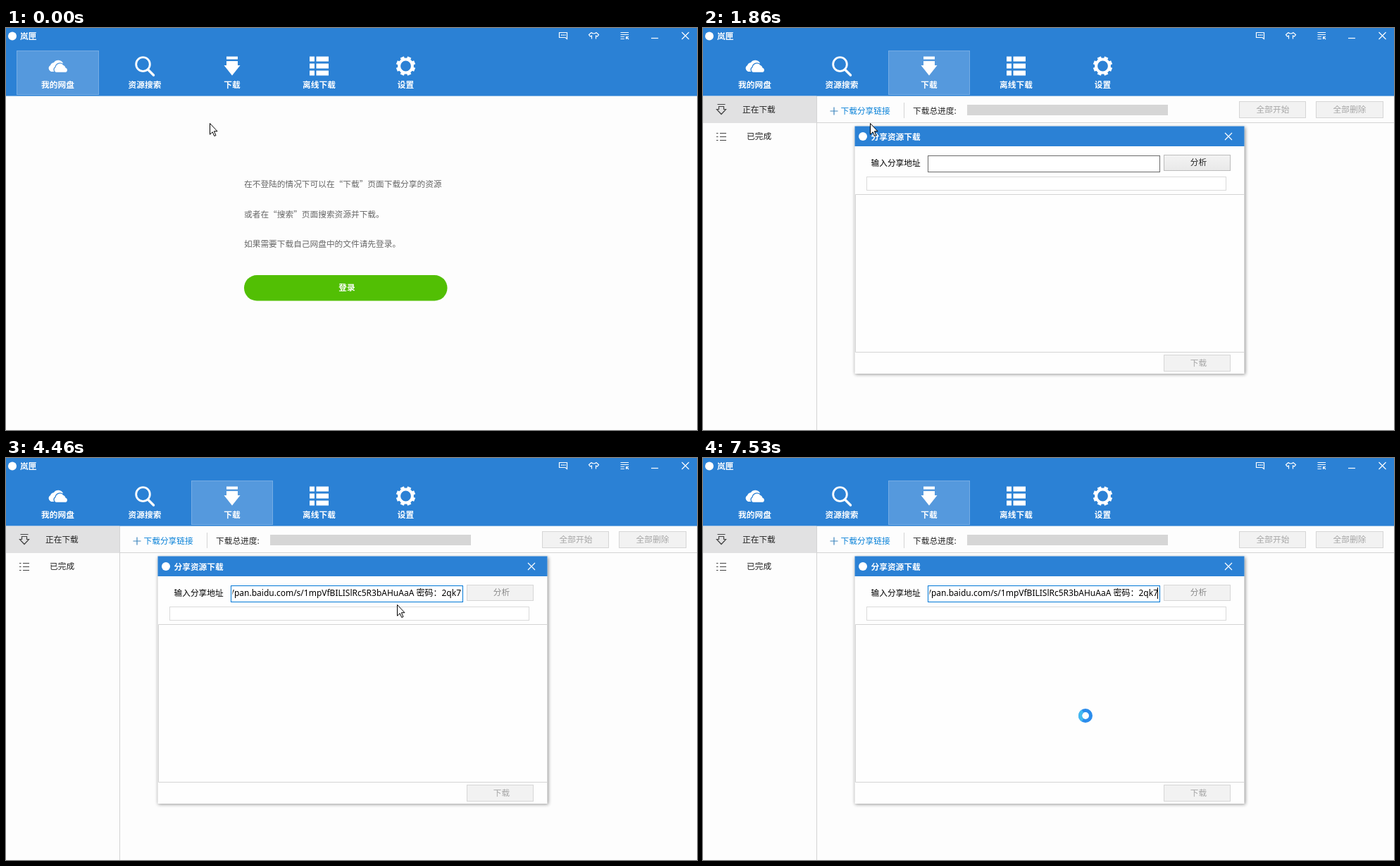
Animation of 981 by 571 pixels, one loop 8 s. Source, as an HTML page:

```html
<!DOCTYPE html>
<html lang="zh-CN">
<head>
<meta charset="utf-8">
<title>网盘下载</title>
<style>
html, body { margin: 0; width: 100%; height: 100%; overflow: hidden; background: #fdfdfd; }
svg { display: block; width: 981px; height: 571px; }
text { font: 11.7px "Noto Sans CJK SC", "Noto Sans CJK", sans-serif; fill: #222; white-space: pre; }
.latin { font-family: "Noto Sans", "Noto Sans CJK SC", sans-serif; font-size: 12px; }
.b { font-weight: 700; fill: #fff; }
.m { text-anchor: middle; }
.note { fill: #666; }
.off { fill: #a6a6a6; }
.black { fill: #000; }
.line { fill: none; stroke: #fff; stroke-width: 1.2; }
.rule { fill: none; stroke: #d4d4d4; }
.btn { fill: #f2f2f2; stroke: #d6d6d6; }
.sys { fill: #e1e1e1; stroke: #adadad; }
.tab { fill: #5599dd; stroke: #75ace4; }
.white { fill: #fff; }
.dark { fill: none; stroke: #444; stroke-width: 1.2; }
</style>
</head>
<body>
<svg viewBox="0 0 981 571" xmlns="http://www.w3.org/2000/svg">
  <defs>
    <clipPath id="clip"><rect x="321.5" y="183" width="325" height="20"/></clipPath>
    <linearGradient id="face" x2="0" y2="1"><stop stop-color="#f3f3f3"/><stop offset="1" stop-color="#e9e9e9"/></linearGradient>
    <linearGradient id="hover" x2="0" y2="1"><stop stop-color="#e8f2fc"/><stop offset="1" stop-color="#dcecfc"/></linearGradient>
    <linearGradient id="press" x2="0" y2="1"><stop stop-color="#daecfc"/><stop offset="1" stop-color="#c4e0fc"/></linearGradient>
    <filter id="soft" x="-5%" y="-5%" width="110%" height="112%"><feGaussianBlur stdDeviation="2.4"/></filter>
    <filter id="deep" x="-5%" y="-12%" width="110%" height="125%"><feGaussianBlur stdDeviation="4.5"/></filter>
    <path id="cross" class="line" d="M-5 -5L5 5M5 -5L-5 5"/>
  </defs>
  <rect width="981" height="571" fill="#fdfdfd"/>

  <!-- header -->
  <rect width="981" height="96.6" fill="#2b81d5"/>
  <circle cx="9" cy="11.5" r="6" class="white"/>
  <text class="b" x="20" y="15.5">岚匣</text>
  <g class="line">
    <path d="M785.5 6.5H796.5V15.5L794 13.5H785.5Z"/>
    <path d="M788 10H789.6M790.4 10H792M792.8 10H794.4" stroke-width="1.6"/>
    <path d="M831 6.5L827.5 9.5L829.5 12L831.5 11V15.5M831 6.5Q834.5 9.5 838 6.5L841.5 9.5L839.5 12L837.5 11V15.5"/>
    <path d="M872.5 6.5H884M872.5 9.5H884M872.5 12.5H878M872.5 15.5H878M880 12.5H884M880.5 12.5V16M880.5 12.5L884 16"/>
    <path d="M916 14.5H926"/>
  </g>
  <use href="#cross" x="964.5" y="11"/>
  <rect id="tab1" class="tab" x="15.5" y="32.5" width="116" height="62"/>
  <rect id="tab3" class="tab" x="263.5" y="32.5" width="115" height="62"/>
  <g class="white">
    <path d="M64 62A5 5 0 0 1 63 53A6 6 0 0 1 68 49A7.5 7.5 0 0 1 81 50L74 62Z"/>
    <path id="cloud" d="M71 63.5A4.5 4.5 0 0 1 70 55.5A6.8 6.8 0 0 1 82 52.5A5.2 5.2 0 0 1 85 56A4 4 0 0 1 85 63.5Z" stroke="#2b81d5" stroke-width="1.3"/>
    <path d="M313 40.5H329V44.5H313ZM313 47H329V53H332.5L321 67.5L309.5 53H313Z"/>
    <path d="M431 40.5h7v7h-7zm9.5 0h17.5v7h-17.5zM431 50.5h7v7h-7zm9.5 0h17.5v7h-17.5zM431 60.5h7v7h-7zm9.5 0h17.5v7h-17.5z"/>
  </g>
  <g fill="none" stroke="#fff">
    <circle cx="194.5" cy="51.5" r="9.8" stroke-width="2.8"/>
    <path d="M201.5 59L209.5 67" stroke-width="3.4" stroke-linecap="round"/>
    <circle cx="567.5" cy="54" r="9.4" stroke-width="4"/>
    <g id="teeth" stroke-width="5.5"/>
  </g>
  <g class="m">
    <text class="b" x="73.5" y="85">我的网盘</text>
    <text class="b" x="197" y="85">资源搜索</text>
    <text class="b" x="321" y="85">下载</text>
    <text class="b" x="444.5" y="85">离线下载</text>
    <text class="b" x="567.5" y="85">设置</text>
  </g>

  <!-- sign-in page -->
  <g id="home">
    <text class="note" x="338" y="226">在不登陆的情况下可以在“下载”页面下载分享的资源</text>
    <text class="note" x="338" y="268.5">或者在“搜索”页面搜索资源并下载。</text>
    <text class="note" x="338" y="311">如果需要下载自己网盘中的文件请先登录。</text>
    <rect x="338" y="351" width="288.5" height="36.5" rx="18.2" fill="#52bf04"/>
    <text class="b m" x="484" y="373">登录</text>
  </g>

  <!-- download page -->
  <g id="list">
    <rect y="96.6" width="161" height="38.4" fill="#e1e1e2"/>
    <path class="rule" d="M161.5 97V571M162 134.5H981M285.5 106V128"/>
    <path class="dark" d="M20.5 108.5H31.5M22.5 111.5H29.5V115.5H32.5L26 122.5L19.5 115.5H22.5Z"/>
    <path class="dark" d="M24 149.5H33M24 154.5H33M24 159.5H33"/>
    <path class="dark" d="M19 149.5H21.5M19 154.5H21.5M19 159.5H21.5" stroke-width="2"/>
    <text x="56" y="119.5">正在下载</text>
    <text x="62" y="158">已完成</text>
    <path id="plus" d="M180.5 118H191.5M186 112.5V123.5" stroke-width="1.2"/>
    <text id="link" x="195.5" y="122">下载分享链接</text>
    <text x="298" y="122">下载总进度:</text>
    <rect x="375" y="109" width="285" height="15" fill="#d6d6d6"/>
    <rect class="btn" x="761.5" y="104.5" width="94" height="23"/>
    <rect class="btn" x="870.5" y="104.5" width="95" height="23"/>
    <text class="off m" x="809" y="120">全部开始</text>
    <text class="off m" x="918" y="120">全部删除</text>
    <path fill="#a9a9ae" d="M537 409A25 25 0 1 1 540 359.2A39 39 0 0 1 616 369A20 20 0 0 1 616 409Z"/>
    <path fill="#dedee2" d="M570 361A4 4 0 0 1 578 361V375H588.5L574 400L559.5 375H570Z"/>
    <text class="m" x="574" y="449.5" style="fill:#777">没有下载内容</text>
  </g>

  <!-- share dialog -->
  <g id="share">
    <rect x="216" y="141" width="554" height="351" opacity=".42" filter="url(#soft)"/>
    <rect x="215.5" y="139.5" width="553" height="351.5" fill="#fefefe"/>
    <rect x="215.5" y="139.5" width="553" height="28.5" fill="#2b81d5"/>
    <circle cx="227" cy="154" r="6" class="white"/>
    <text class="b" x="238.5" y="158.5">分享资源下载</text>
    <use href="#cross" x="746" y="154"/>
    <text class="black" x="238.5" y="196">输入分享地址</text>
    <rect id="field" x="319.5" y="181.5" width="329" height="23"/>
    <g clip-path="url(#clip)">
      <text id="url" class="latin black" x="646" y="196" text-anchor="end">/pan.baidu.com/s/1mpVfBILISlRc5R3bAHuAaA 密码：2qk7</text>
    </g>
    <path id="caret" d="M645.5 184V200" stroke="#000"/>
    <rect id="parse" x="654.5" y="180.5" width="94" height="22"/>
    <text id="parseText" class="m" x="703.5" y="195">分析</text>
    <rect x="232.5" y="211.5" width="510" height="19" fill="#fff" stroke="#dadada"/>
    <path class="rule" d="M768 236.5H216.5V460.5H768"/>
    <rect class="btn" x="654.5" y="464.5" width="94" height="23"/>
    <text class="off m" x="703.5" y="480">下载</text>
  </g>

  <!-- save dialog -->
  <g id="save">
    <rect x="217" y="227" width="553" height="178" opacity=".55" filter="url(#deep)"/>
    <rect x="216.5" y="225.5" width="550" height="177" fill="#f0f0f0" stroke="#0078d7"/>
    <rect x="216" y="225" width="551" height="25" fill="#0078d7"/>
    <circle cx="227" cy="238" r="6" fill="#3cb4ee"/>
    <text x="240" y="242" style="font-size:12.5px;fill:#fff">下载设置</text>
    <use href="#cross" x="752" y="238"/>
    <text x="246.5" y="325">下载到:</text>
    <rect x="291.5" y="309.5" width="365" height="23" fill="#fff" stroke="#0078d7"/>
    <text class="latin" x="293.5" y="325">H:\Baiduyunpan</text>
    <rect class="sys" x="664.5" y="308.5" width="70" height="22"/>
    <rect id="ok" x="511.5" y="363.5" width="94" height="22"/>
    <rect class="sys" x="640.5" y="363.5" width="94" height="22"/>
    <rect x="246.5" y="368.5" width="12" height="12" fill="#fff" stroke="#333"/>
    <text class="black" x="261.5" y="379.5">设置为默认下载路径</text>
    <text class="black m" x="699" y="324">浏览</text>
    <text class="black m" x="558.5" y="379">下载</text>
    <text class="black m" x="687" y="379">取消</text>
  </g>

  <!-- pointers -->
  <path id="arrow" d="M.5 .5V16.2L4.2 12.7L6.8 18.5L9 17.5L6.4 11.7H11Z" fill="#fff" stroke="#000"/>
  <path id="beam" d="M-3 -7.5H-1L0 -7L1 -7.5H3M0 -7V7M-3 7.5H-1L0 7L1 7.5H3" fill="none" stroke="#000"/>
  <g id="ring" fill="none" stroke-width="5">
    <circle cx="543" cy="366" r="7.5" stroke="#2b8cec"/>
    <path d="M539 372.3A7.5 7.5 0 0 1 539 359.7" stroke="#42b9f0"/>
  </g>
</svg>
<script>
const LOOP = 8000, STEP = 73;
const $ = id => document.getElementById(id);
const show = (id, on) => $(id).style.display = on ? '' : 'none';
const paint = (id, fill, stroke) => {
  $(id).setAttribute('fill', fill);
  $(id).setAttribute('stroke', stroke);
};
const within = (t, a, b) => t >= a && t < b;
const clamp = v => Math.max(0, Math.min(1, v));

// pointer route: time, x, y
const route = [
  [0, 289, 135], [310, 289, 135], [520, 345, 41], [895, 345, 41],
  [1120, 366, 110], [1270, 350, 143], [1350, 330, 125], [1490, 238, 119],
  [1780, 238, 119], [1860, 237, 135], [2510, 520, 192], [3200, 520, 192],
  [3410, 655, 203], [3500, 655, 203], [3570, 657, 203], [3930, 679, 196],
  [4005, 679, 196], [4460, 555, 208], [4810, 504, 224], [5269, 504, 224],
  [5270, 498, 220], [5960, 498, 220], [6250, 543, 384], [6330, 543, 384],
  [6470, 543, 364], [LOOP, 543, 364]
];

function pointer(t) {
  let i = 0;
  while (i < route.length - 2 && t >= route[i + 1][0]) i++;
  const [t0, x0, y0] = route[i], [t1, x1, y1] = route[i + 1];
  const n = Math.max(1, Math.round((t1 - t0) / STEP));
  const u = Math.floor((t - t0) / (t1 - t0) * n) / n;
  return [Math.round(x0 + (x1 - x0) * u), Math.round(y0 + (y1 - y0) * u)];
}

function drawTeeth() {
  let s = '';
  for (let a = 0; a < 360; a += 45)
    s += `<path d="M567.5 45V40.3" transform="rotate(${a + 22.5} 567.5 54)"/>`;
  $('teeth').innerHTML = s;
}

function draw(t) {
  const [x, y] = pointer(t);

  show('tab1', t < 660);
  show('tab3', t >= 450);
  $('tab3').setAttribute('opacity', t < 660 ? 0.55 : 1);
  $('cloud').setAttribute('stroke', t < 660 ? '#5599dd' : '#2b81d5');
  show('home', t < 740);
  show('list', t >= 740);

  $('link').style.fill = t < 1490 ? '#1c4fae' : '#0a82d8';
  $('plus').setAttribute('stroke', t < 1630 ? '#4a6f9e' : '#3f86bd');

  show('share', t >= 1780);
  $('share').setAttribute('opacity', t < 1860 ? 0.6 : 1);

  const over = within(t, 2440, 3410);
  const focus = within(t, 3410, 5580) || t >= 6850;
  paint('field', '#fff', over ? '#222' : focus ? '#0078d7' : '#6a6a6a');
  show('url', t >= 2810);
  show('caret', within(t, 2810, 3340) || within(t, 3870, 4400) || t >= 7530);

  if (t < 3570) paint('parse', 'url(#face)', '#bcbcbc');
  else if (t < 3790) paint('parse', 'url(#hover)', '#7eb4ea');
  else if (t < 3930) paint('parse', 'url(#press)', '#569de5');
  else paint('parse', '#f2f2f2', '#d6d6d6');
  $('parseText').style.fill = t < 3930 ? '#222' : '#8a8a8a';

  show('save', within(t, 5580, 6770));
  const fadeIn = (Math.floor((t - 5580) / STEP) + 1) / 4;
  const fadeOut = 1 - Math.floor((t - 6550) / STEP) / 3;
  $('save').setAttribute('opacity', Math.min(clamp(fadeIn), clamp(fadeOut)));
  if (t < 6250) paint('ok', '#e1e1e1', '#adadad');
  else if (t < 6330) paint('ok', '#e0e3e6', '#7f9fbd');
  else if (t < 6470) paint('ok', '#e5f1fb', '#0078d7');
  else paint('ok', '#cce4f7', '#005499');

  const busy = t >= 7450;
  show('ring', busy);
  show('beam', over);
  show('arrow', !over && !busy);
  $('arrow').setAttribute('transform', `translate(${x} ${y})`);
  $('beam').setAttribute('transform', `translate(${x + 0.5} ${y})`);
}

drawTeeth();
let start;
function tick(now) {
  if (start === undefined) start = now;
  draw(Math.max(0, now - start) % LOOP);
  requestAnimationFrame(tick);
}
draw(0);
requestAnimationFrame(tick);
</script>
</body>
</html>
```
